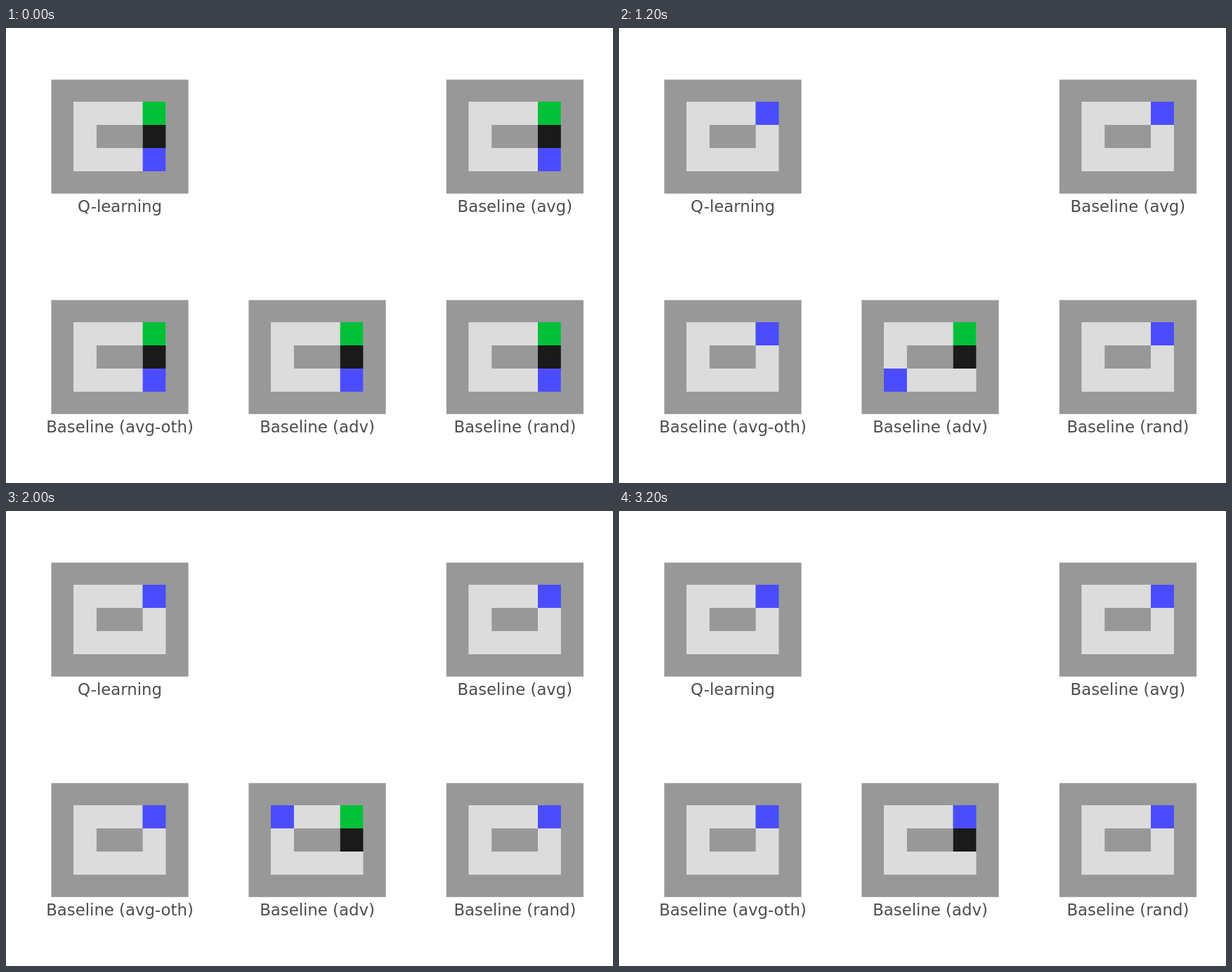
An HTML page that plays this animation: 864 px wide and 648 px high, repeating every 3600 ms.

```html
<!DOCTYPE html>
<html lang="en">
<head>
<meta charset="utf-8">
<title>Grid world agents</title>
<style>
  html, body { margin: 0; width: 100%; height: 100%; overflow: hidden; background: #fff; }
  svg { display: block; width: 864px; height: 648px; }
  text { font: 22.8px "DejaVu Sans", sans-serif; fill: #4d4d4d; text-anchor: middle; }
</style>
</head>
<body>
<svg id="stage" viewBox="0 0 864 648"></svg>
<script>
const STEP = 400, LOOP = 3600;
const CELL_W = 32.87, CELL_H = 33;
const WALL = '#989898', FLOOR = '#dcdcdc', GOAL = '#00c03a', TRAP = '#1a1a1a', AGENT = '#4c4cff';

// Agent routes as [column, row], one cell per step; the last cell is kept.
const DIRECT = [[3, 2], [3, 1], [3, 0]];
const DETOUR = [[3, 2], [2, 2], [1, 2], [0, 2], [0, 1], [0, 0], [1, 0], [2, 0], [3, 0]];

// x, y: top left corner of the walkable area
const worlds = [
  { label: 'Q-learning', x: 96, y: 105, route: DIRECT },
  { label: 'Baseline (avg)', x: 658.4, y: 105, route: DIRECT },
  { label: 'Baseline (avg-oth)', x: 96, y: 419, route: DIRECT },
  { label: 'Baseline (adv)', x: 377, y: 419, route: DETOUR },
  { label: 'Baseline (rand)', x: 658.4, y: 419, route: DIRECT }
];

const stage = document.getElementById('stage');

function add(parent, tag, attrs) {
  const el = document.createElementNS('http://www.w3.org/2000/svg', tag);
  for (const name in attrs) el.setAttribute(name, attrs[name]);
  return parent.appendChild(el);
}

function cells(parent, col, row, cols, rows, fill) {
  return add(parent, 'rect', {
    x: col * CELL_W, y: row * CELL_H, width: cols * CELL_W, height: rows * CELL_H, fill
  });
}

for (const world of worlds) {
  const g = add(stage, 'g', { transform: `translate(${world.x} ${world.y})` });
  add(g, 'rect', { x: -31.6, y: -31.5, width: 195.2, height: 162.3, fill: WALL });
  cells(g, 0, 0, 4, 3, FLOOR);
  cells(g, 1, 1, 2, 1, WALL);
  cells(g, 3, 0, 1, 1, GOAL);
  world.trap = cells(g, 3, 1, 1, 1, TRAP);
  world.agent = cells(g, 0, 0, 1, 1, AGENT);
  add(g, 'text', { x: 66, y: 157 }).textContent = world.label;
}

function draw(time) {
  const step = Math.floor((time % LOOP) / STEP);
  for (const { route, agent, trap } of worlds) {
    const [col, row] = route[Math.min(step, route.length - 1)];
    agent.setAttribute('x', col * CELL_W);
    agent.setAttribute('y', row * CELL_H);
    // Walking over the trap removes it.
    const cleared = route === DIRECT && step > 0;
    trap.setAttribute('visibility', cleared ? 'hidden' : 'visible');
  }
}

let start;
function tick(now) {
  start ??= now;
  draw(now - start);
  requestAnimationFrame(tick);
}
draw(0);
requestAnimationFrame(tick);
</script>
</body>
</html>
```
